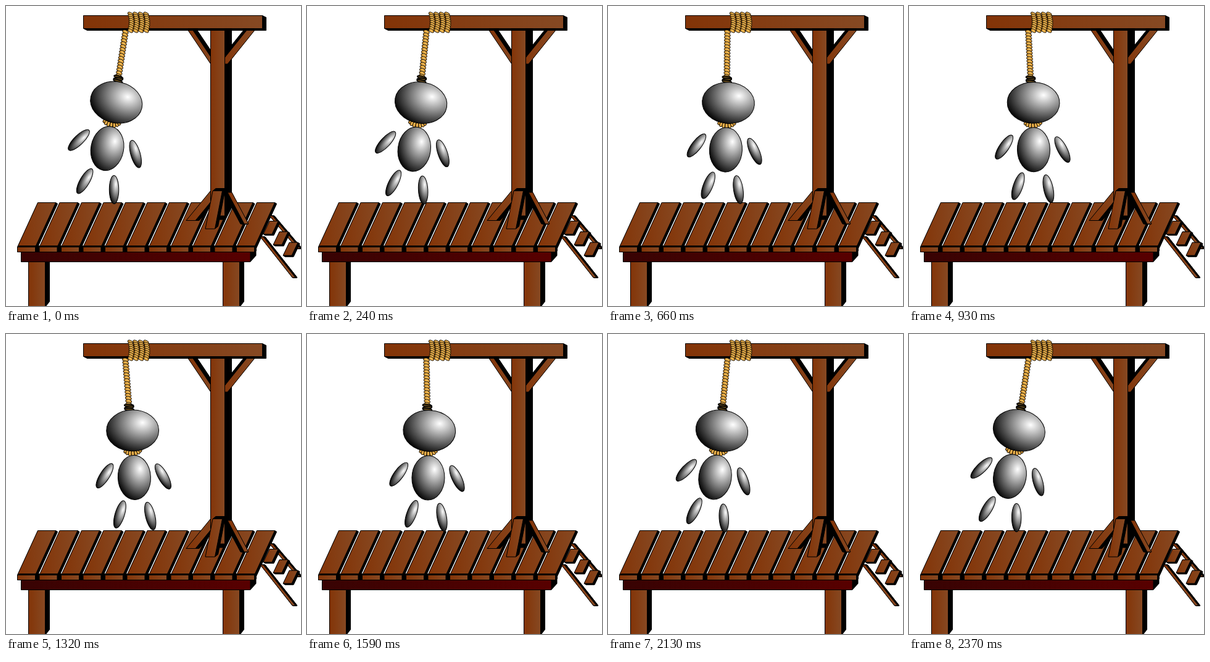
An HTML page with a canvas for the animation above (2400 ms loop, 478 by 486 pixels).

```html
<!DOCTYPE html>
<html>
<head>
<meta charset="utf-8">
<style>
html, body { margin: 0; width: 478px; height: 486px; overflow: hidden; background: #fff; }
canvas { display: block; }
</style>
</head>
<body>
<canvas id="stage" width="478" height="486"></canvas>
<script>
const ctx = document.getElementById('stage').getContext('2d');
const RAD = Math.PI / 180;
const WOOD = ['#833407', '#864923'];
const MAROON = ['#380303', '#580000'];

function paint(fill, width = 1) {
  ctx.fillStyle = fill;
  ctx.fill();
  ctx.strokeStyle = '#000';
  ctx.lineWidth = width;
  ctx.stroke();
}

function blend(x1, x2, ...colors) {
  const g = ctx.createLinearGradient(x1, 0, x2, 0);
  colors.forEach((c, i) => g.addColorStop(i / (colors.length - 1), c));
  return g;
}

// Bar with level ends whose foot is shifted sideways by lean
function bar(fill, x, y, w, h, lean = 0) {
  ctx.beginPath();
  ctx.moveTo(x, y);
  ctx.lineTo(x + w, y);
  ctx.lineTo(x + w + lean, y + h);
  ctx.lineTo(x + lean, y + h);
  ctx.closePath();
  paint(fill);
}

function face(x, y, w, h, lean = 0, colors = WOOD) {
  bar(blend(Math.min(x, x + lean), Math.max(x, x + lean) + w, ...colors), x, y, w, h, lean);
}

// Black sides, extruded backwards by (depth, drop)
function sides(x, y, w, h, lean, depth, drop) {
  for (let k = 10; k > 0; k--) bar('#000', x + depth * k / 10, y + drop * k / 10, w, h, lean);
}

function slab(x, y, w, h, lean, depth, drop = 0, colors = WOOD) {
  sides(x, y, w, h, lean, depth, drop);
  face(x, y, w, h, lean, colors);
}

function platform() {
  for (const x of [36.5, 351.5]) slab(x, 414, 27, 74, 0, 7, -9);
  slab(24.5, 398.5, 371.5, 16, 0, 9, -10, MAROON);
  for (let i = 0; i < 11; i++) {
    const x = 18.5 + 35.5 * i;
    slab(x + 33, 318.5, 29, 72, -33, 3, 2);
    slab(x, 390.5, 29, 8, 0, 3, -2);
  }
}

function ladder() {
  slab(427, 340, 5, 53, 45, 3);
  slab(412, 374, 5, 66, 52, 3);
  for (let i = 0; i < 3; i++) slab(427 + 16 * i, 348.5 + 17.3 * i, 14, 21, -10, 3, 2);
}

function gallows() {
  sides(331.5, 36, 23, 312, 0, 11, -20);
  slab(294, 38, 8, 55, 37, 7);
  slab(391, 38, 13, 56, -45, -5);
  slab(331, 300, 15, 47.5, -39, 6);
  slab(359, 302, 7, 51, 27, -6);
  face(331.5, 36, 23, 304);
  slab(335, 299.5, 15.5, 61.5, -12, 5, -4);
  slab(125.5, 15.5, 290, 21, 0, 6, 3);
}

function strand(x, y, rx, ry, tilt) {
  ctx.beginPath();
  ctx.ellipse(x, y, rx, ry, tilt * RAD, 0, 7);
  paint(blend(x - rx, x + rx, '#b97a1e', '#f6bf58', '#c98527'), .9);
}

function coils() {
  for (let c = 0; c < 4; c++)
    for (let u = 0; u <= 1; u += .125)
      strand(201.5 + 8.5 * c + 2 * Math.sin(u * Math.PI), 13 + 27 * u, 4.6, 2.5, 25);
}

// Squashed sphere lit from the upper right
function ball(x, y, rx, ry, tilt) {
  const light = ctx.createRadialGradient(.38, -.38, 0, .38, -.38, 1.55);
  light.addColorStop(0, '#fff');
  light.addColorStop(1, '#000');
  ctx.save();
  ctx.translate(x, y);
  ctx.rotate(tilt * RAD);
  ctx.scale(rx, ry);
  ctx.beginPath();
  ctx.arc(0, 0, 1, 0, 7);
  ctx.fillStyle = light;
  ctx.fill();
  ctx.restore();
  ctx.lineWidth = 1;
  ctx.stroke();
}

const limb = (x, y, tilt) => ball(x, y, 7.7, 23, tilt);

function figure(angle) {
  ctx.save();
  ctx.translate(193, 42);
  ctx.rotate(angle * RAD);
  for (let y = 0; y < 75; y += 4.8) strand(.5, y, 5, 3, 18);
  for (let a = 160; a > 10; a -= 23)
    strand(1 + 12 * Math.cos(a * RAD), 144 + 8 * Math.sin(a * RAD), 2.6, 4.4, (a - 90) / 2);
  for (let i = 0; i < 3; i++) {
    ctx.beginPath();
    ctx.ellipse(.5, 74 + i * 3.2, 7.6, 2.2, (i % 2 ? -6 : 8) * RAD, 0, 7);
    paint('#59421a', 1.6);
  }
  ball(3.2, 115, 42.4, 33.3, 4);
  ball(0, 191, 26.5, 36, 2);
  limb(-47.6, 184.5, 37);
  limb(46.5, 193, -24.6);
  limb(-28.1, 248.8, 21.4);
  limb(20.9, 255.3, -9);
  ctx.restore();
}

// Steady swing out for 1200 ms, then back
function swing(t) {
  return t < 1200 ? 8.7 - 14.7 * t / 1200 : -6 + 14.9 * (t - 1200) / 1170;
}

function draw(now) {
  const t = Math.floor(now % 2400 / 30) * 30;
  ctx.clearRect(0, 0, 478, 486);
  platform();
  ladder();
  gallows();
  figure(swing(t));
  coils();
  requestAnimationFrame(draw);
}
requestAnimationFrame(draw);
</script>
</body>
</html>
```
